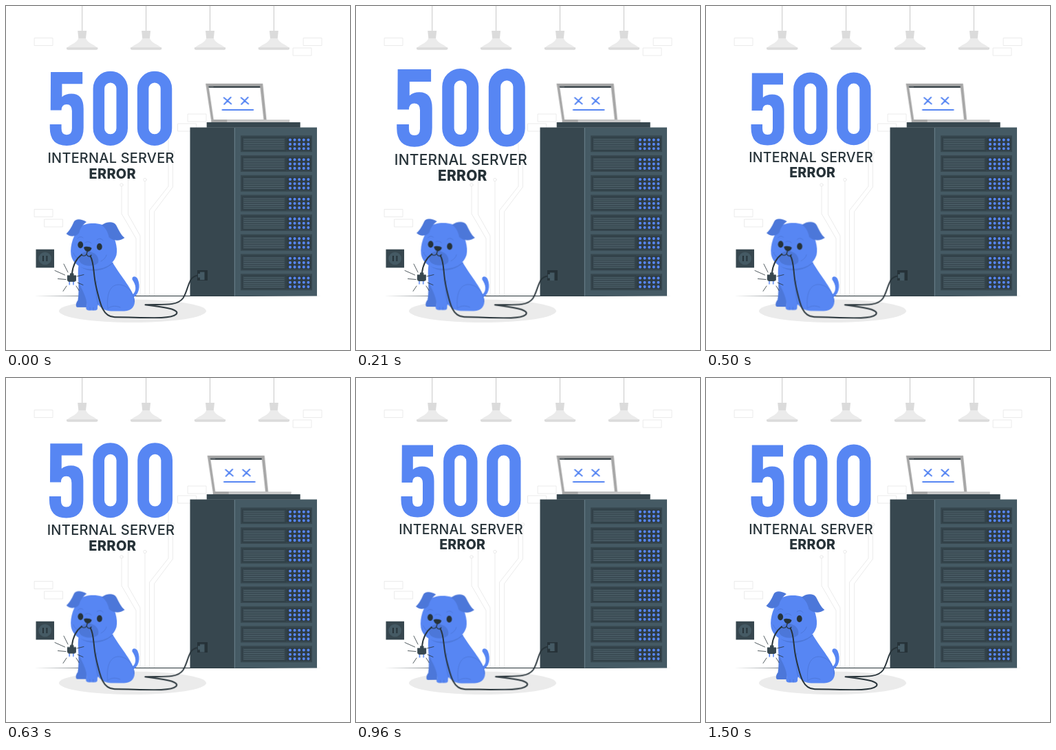
Write an HTML page that moves like this. It is 500 by 500 pixels and loops after 1.54 s.

```html
<!DOCTYPE html>
<html lang="en">
<head>
<meta charset="utf-8">
<title>500 Internal Server Error</title>
<style>
  :root { --blue: #5786f3; --shade: #4c77d9; --ink: #263238; --side: #37474f; --front: #455a64; --pale: #ebebeb; }
  html, body { margin: 0; width: 100%; height: 100%; overflow: hidden; background: #fff; }
  svg { display: block; width: 100vw; height: 100vh; }
  .title, .laptop, .dog { animation: 1540ms linear -30ms infinite; }
  .title { animation-name: heartbeat; transform-origin: 152.5px 172.5px; }
  .laptop { animation-name: shake; }
  .dog { animation-name: sway; transform-origin: 188px 381px; }
  .title text { font: 500 19.5px Inter, sans-serif; letter-spacing: .25px; text-anchor: middle; fill: var(--ink); }
  .title .bold { font-weight: 800; }
  .blue { fill: var(--blue); }
  .shade { fill: var(--shade); }
  .ink { fill: var(--ink); }
  .side { fill: var(--side); }
  .front { fill: var(--front); }
  .line { fill: none; stroke-linecap: round; stroke-linejoin: round; }
  .cable { stroke: var(--ink); stroke-width: 1.9; }
  .fold { stroke: var(--shade); stroke-width: .9; }
  .pale { stroke: var(--pale); stroke-width: 1; }

  @keyframes heartbeat {
    0%, 30%, 40%, 60%, 100% { transform: scale(1); }
    10%, 50% { transform: scale(1.1); }
  }
  @keyframes shake {
    0%, 100% { transform: translateX(0); }
    10%, 30%, 50%, 70%, 90% { transform: translateX(-4px); }
    20%, 40%, 60%, 80% { transform: translateX(4px); }
  }
  @keyframes sway {
    0%, 100% { transform: rotate(0deg); }
    25% { transform: rotate(1deg); }
    75% { transform: rotate(-1deg); }
  }
</style>
</head>
<body>
<svg viewBox="0 0 500 500">
  <defs>
    <g id="lamp">
      <path d="M0 0V37" stroke="#c7c7c7"/>
      <path d="M-6.5 36H6.5L5.3 47.5H-5.3Z" fill="#dbdbdb"/>
      <path d="M-5.3 47H5.3C8 54 16 55 22.5 61H-22.5C-16 55 -8 54 -5.3 47Z" fill="#ebebeb"/>
      <path d="M-22.5 60.3H22.5Q23.5 63.8 20 63.8H-20Q-23.5 63.8 -22.5 60.3Z" fill="#dbdbdb"/>
    </g>
    <rect id="brick" width="26.5" height="11" class="line pale"/>
    <g id="unit">
      <path class="side" d="M341 188.3H445V212.3H341Z"/>
      <path d="M343.5 191H407V210H343.5Z" fill="none" stroke="#2c3a41" stroke-width=".8"/>
      <path d="M375 193.6V208.5" stroke="#51666f" stroke-width="59" stroke-dasharray="1 1.75"/>
      <path d="M408.5 191H443.5V210H408.5Z" fill="#2e3c44"/>
      <path class="line" d="M413 194.6h27M413 200.9h27M413 207.2h27" stroke="#5786f3" stroke-width="4.1" stroke-dasharray="0 6.6"/>
    </g>
  </defs>

  <g class="line pale">
    <path d="M168 262.3V302L189 338V421M177.5 250V303L195 334V421M202 254.8V421M236 195V262L208.5 297V421M242.5 215V263L215.5 299V421"/>
    <circle cx="168" cy="260" r="2.2"/>
    <circle cx="202" cy="252.5" r="2.2"/>
    <circle cx="242.5" cy="212.8" r="2.2"/>
  </g>
  <use href="#brick" x="41.5" y="46.5"/>
  <use href="#brick" x="432.5" y="46.5"/>
  <use href="#brick" x="417.5" y="61"/>
  <use href="#brick" x="264.5" y="157"/>
  <use href="#brick" x="250" y="171"/>
  <use href="#brick" x="41.5" y="295.5"/>
  <use href="#brick" x="56" y="310"/>

  <use href="#lamp" x="110.7"/>
  <use href="#lamp" x="203.6"/>
  <use href="#lamp" x="296.5"/>
  <use href="#lamp" x="389.4"/>

  <ellipse cx="184" cy="443.3" rx="107" ry="16.8" fill="#ebebeb"/>
  <path class="ink" d="M41 421.5L150 421H350L459 421.5L350 422H150Z"/>

  <g class="title">
    <path class="blue" d="M66.800 97.500H112V114.300H82.800V133Q88 128.500 96 128.500Q113.500 128.500 113.500 150V177Q113.500 202.500 89.500 202.500Q65.500 202.500 65.500 177V172H82V178Q82 187 89.500 187Q97 187 97 178V153Q97 143.500 89.500 143.500Q82 143.500 82 152H66.500Z"/>
    <g fill="none" stroke="#5786f3" stroke-width="16.2">
      <rect x="135.200" y="104.500" width="33.200" height="89.700" rx="16.500"/>
      <rect x="198.200" y="104.500" width="33.200" height="89.700" rx="16.500"/>
    </g>
    <text x="152.500" y="226.800">INTERNAL SERVER</text>
    <text class="bold" x="154.700" y="249">ERROR</text>
  </g>

  <path class="side" d="M267.500 176.500H332.500V421.500H267.500Z"/>
  <path class="front" d="M332 176.500H452V421.500H332Z"/>
  <path d="M332.300 177V421.500" stroke="#78909c" stroke-width=".8"/>
  <path class="side" d="M291.700 169H427.700V176.700H291.700Z"/>
  <g id="units"></g>

  <g class="laptop">
    <path d="M291 112.800H374L379.500 166H299Z" fill="#a6a6a6"/>
    <path d="M295.300 116.500H370L375.300 165H302.500Z" fill="#fff"/>
    <path class="ink" d="M295.300 116.500H370L370.300 118.800H295.600Z"/>
    <path class="line" d="M297.500 117.700h4" stroke="#aaa" stroke-width="1" stroke-dasharray="0 1.900"/>
    <path d="M299 165.300H413V168.900H299Z" fill="#c7c7c7"/>
    <path d="M299 165.300H322V168.900H299Z" fill="#a6a6a6"/>
    <path class="line" d="M317.500 133.300l10.500 9m-.5-9.500l-9.500 10M342.500 133.300l10.500 9m-.5-9.500l-9.500 10M315.300 151H360" stroke="#5786f3" stroke-width="2"/>
  </g>

  <path class="side" d="M43.500 353.700H70V380.400H43.500Z"/>
  <circle class="front" cx="56.700" cy="367" r="9.300"/>
  <path d="M54 363V371M59.400 363V371" stroke="#263238" stroke-width="1.900"/>

  <path class="ink" d="M278 384H293V399H278Z"/>

  <g class="dog">
    <path class="blue" d="M183 420C191 415 189 405 183.500 397.500C182.500 392.500 189 391.500 191.500 397C196 408 193 419 185 424Z"/>
    <path class="shade" d="M106 378C104 396 107 414 104.500 428C101 432 101 438 104 438H117.500L120 400Z"/>
    <path class="blue" d="M106 374C103.500 388 105 400 109 409C114 418 118 428 117.500 436C115 440 117 442.500 121 442.500H130Q134 442 133 437L134 434C139 440 145 443.500 153 443.500H172C183 443 188 436 187 427C184 411 169 396 155 373Z"/>
    <path class="shade" d="M108 379C122 389 145 386 157 372C149 379 120 382 108 374Z"/>
    <path class="line fold" d="M148 440C146 421 150 406 163 405C177 405 186 417 186.500 430M134 434C131 424 130 411 132 400M122 438.500v3.500M127 438.500v3.500M148 440C152 436 159 435 166 438"/>

    <path class="blue" d="M107 322C115 314 139 314 149 323C158 334 163 351 160.500 362C156 377 142 383 126 382.500C109 383 97 375 94.500 362C92.500 347 99 331 107 322Z"/>
    <path class="shade" d="M117 314C109 309 101 309 98.500 314C95 322 92 327 87.500 331C92 336 102 336 106 330C108 323 111 318 117 314Z"/>
    <path class="shade" d="M139 318.500C146 313.500 156 312.500 160 318.500C164 326 167 333 172.300 337C166 342 155 342 149.500 336C148 328 144 322 139 318.500Z"/>
    <path class="shade" d="M116 357C107 360 103 368 109 374C115 379 130 379 134 373C136 365 130 359 122 357Z"/>
    <path class="line fold" d="M104 338C106 335 110 335 112 337M132 340C135 337 139 338 141 341M115 344C118 342 121 342 124 345M98 359C99 363 102 366 105 367M146 362C145 366 142 369 138 371"/>
    <ellipse class="ink" cx="108.200" cy="347.200" rx="3.900" ry="5"/>
    <ellipse class="ink" cx="135.800" cy="350" rx="3.900" ry="5"/>
    <path class="ink" d="M113 351C115 349 122 349.500 124.500 352C124 355 121 357 118.500 357C116 357 113.500 354 113 351Z"/>
    <path class="line" d="M118.500 356L117 361C115 364 111 364 109.500 361M117 361C119 365 123 365 124 362" stroke="#263238" stroke-width="1.200"/>

    <path class="line cable" d="M110 361.500C101 368 97 378 95.800 390M122.500 363.500C128.500 373 126.500 389 131 408C137 434 141 452 158 452.300C182 452.300 203 453.500 226 453C249 452 255 445 241 440.500C229 437 215 436 202.500 434.300C225 433 248 437 257 425C266 412 264 393 279 391.500"/>
    <path class="side" d="M93 388.500H98.500V391.500H102V399.500L99.500 401H91L89 399V391.500H93Z"/>
    <path d="M92.300 401V405.500M98 401V405.500" stroke="#5786f3" stroke-width="1.600"/>
    <path class="front" d="M279 389H282V386.500H288.500V398H282V394.500H279Z"/>
  </g>

  <path class="line" d="M71 384.500L85.500 391M84 375L90 387M75.500 396.500L87 397.500M83 414.500L88 407M103 393L113 390.500M104 402L112 405.500M102 407L106 413.500" stroke="#263238" stroke-width=".8"/>
</svg>
<script>
  const units = document.getElementById("units");
  for (let i = 0; i < 8; i++) {
    const unit = document.createElementNS("http://www.w3.org/2000/svg", "use");
    unit.setAttribute("href", "#unit");
    unit.setAttribute("y", i * 28.7);
    units.append(unit);
  }
</script>
</body>
</html>
```
